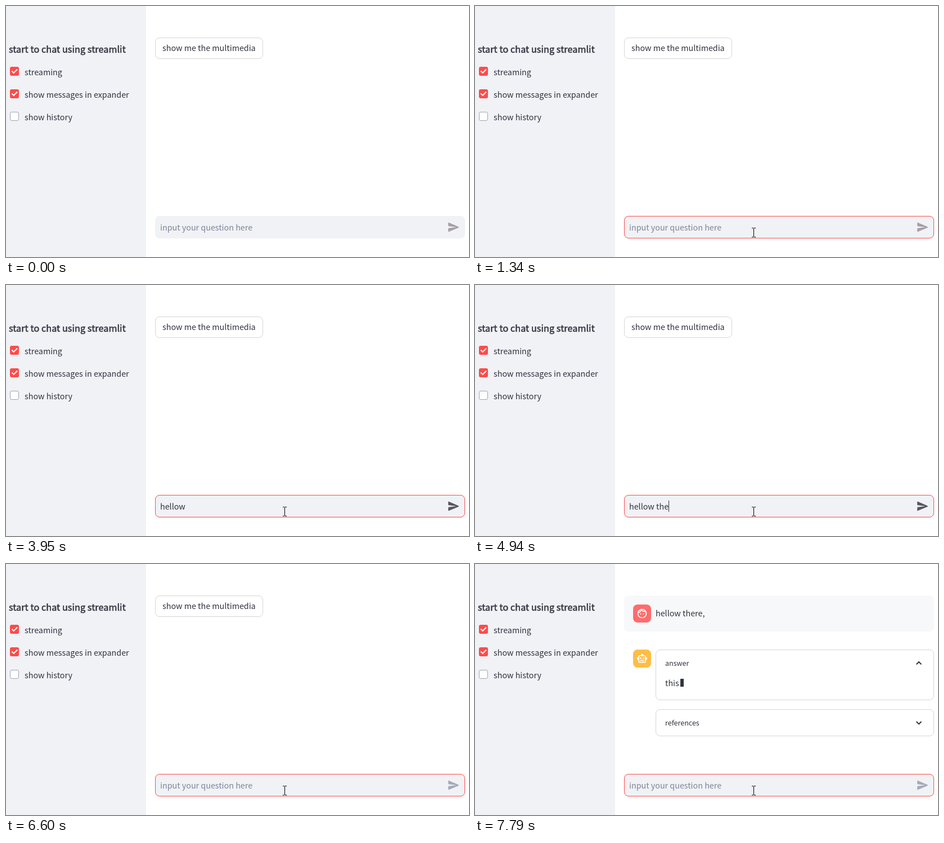
An HTML page that plays this animation: 823 by 446 pixels, repeating every 8000 ms.

```html
<!DOCTYPE html>
<html lang="en">
<head>
<meta charset="utf-8">
<title>Chat demo</title>
<style>
  html, body { margin: 0; width: 100%; height: 100%; overflow: hidden; background: #fff; }
  svg { display: block; }
  text {
    font: 14.32px "Noto Sans CJK SC", "Noto Sans CJK JP", "Noto Sans CJK", "Open Sans", sans-serif;
    fill: #31333f;
    white-space: pre;
  }
  .title { font-size: 16.12px; letter-spacing: .1px; stroke: #31333f; stroke-width: .5px; }
  .small { font-size: 12.53px; }
  .hint { fill: #808495; }
  .card { fill: #fff; stroke: #d6d6d9; }
  .chevron { fill: none; stroke: #31333f; stroke-width: 2; }
</style>
</head>
<body>
<svg width="823" height="446" viewBox="0 0 823 446">
  <defs>
    <g id="checked">
      <rect width="16" height="16" rx="3" fill="#ff4b4b"/>
      <path transform="translate(2.3 3.8) scale(.68)" fill="#fff"
        d="M6.5 12.6L.4 6.6 2.6 4.4 6.5 8.3 14.7 .1 16.9 2.3z"/>
    </g>
  </defs>

  <rect width="249" height="446" fill="#f0f2f6"/>
  <text class="title" x="5" y="83">start to chat using streamlit</text>
  <use href="#checked" x="7" y="108"/>
  <text x="33" y="123">streaming</text>
  <use href="#checked" x="7" y="148"/>
  <text x="33" y="163">show messages in expander</text>
  <rect x="7.5" y="188.5" width="15" height="15" rx="2.5" fill="#fff" stroke="#a3a5ad"/>
  <text x="33" y="203">show history</text>

  <g id="start">
    <rect class="card" x="265.5" y="56.5" width="191" height="37" rx="7.5"/>
    <text x="278" y="80">show me the multimedia</text>
  </g>

  <g id="chat">
    <rect x="265" y="56" width="551" height="64" rx="8" fill="#f7f8fa"/>
    <rect x="281" y="72" width="32" height="32" rx="8" fill="#ff6c6c"/>
    <g transform="translate(287 78) scale(.833)" fill="none" stroke="#fff" stroke-width="2">
      <circle cx="12" cy="12" r="9"/>
      <path d="M3.5 10.5C7 9.5 9.5 7 10.5 3.5C12.5 7 15.5 8.5 20.3 8"/>
      <g fill="#fff" stroke="none">
        <circle cx="9" cy="13" r="1.25"/><circle cx="15" cy="13" r="1.25"/>
      </g>
    </g>
    <text x="321" y="93">hellow there,</text>

    <rect x="281" y="152" width="32" height="32" rx="8" fill="#ffbd45"/>
    <path transform="translate(287 158) scale(.833)" fill="#fff" d="M20 9V7c0-1.1-.9-2-2-2h-3c0-1.66-1.34-3-3-3S9 3.34 9 5H6c-1.1 0-2 .9-2 2v2c-1.66 0-3 1.34-3 3s1.34 3 3 3v4c0 1.1.9 2 2 2h12c1.1 0 2-.9 2-2v-4c1.66 0 3-1.34 3-3s-1.34-3-3-3zm-2 10H6V7h12v12zm-9-6c-.83 0-1.5-.67-1.5-1.5S8.17 10 9 10s1.5.67 1.5 1.5S9.83 13 9 13zm7.5-1.5c0 .83-.67 1.5-1.5 1.5s-1.5-.67-1.5-1.5.67-1.5 1.5-1.5 1.5.67 1.5 1.5zM8 15h8v2H8v-2z"/>
    <rect class="card" x="321.5" y="152.5" width="494" height="89" rx="7.5"/>
    <text class="small" x="338" y="181">answer</text>
    <path class="chevron" d="M784.6 178.4l4.4-4.4 4.4 4.4"/>
    <text id="answer" x="338" y="217"></text>
    <rect id="block" y="204" width="6" height="14" fill="#31333f"/>
    <rect class="card" x="321.5" y="258.5" width="494" height="47" rx="7.5"/>
    <text class="small" x="338" y="287">references</text>
    <path class="chevron" d="M784.6 280l4.4 4.4 4.4-4.4"/>
  </g>

  <rect x="265" y="373" width="551" height="40" rx="8" fill="#f0f2f6"/>
  <rect id="focus" x="265.5" y="373.5" width="550" height="39" rx="7.5" fill="none" stroke="#ff4b4b"/>
  <text id="hint" class="hint" x="274" y="399">input your question here</text>
  <text id="typed" x="274" y="399"></text>
  <rect id="caret" y="383" width="1" height="20" fill="#31333f"/>
  <path id="send" transform="translate(784.2 381.5) scale(.96)" d="M3.4 20.4l17.45-7.48c.81-.35.81-1.49 0-1.84L3.4 3.6c-.66-.29-1.39.2-1.39.91L2 9.12c0 .5.37.93.87.99L17 12 2.87 13.88c-.5.07-.87.5-.87 1l.01 4.61c0 .71.73 1.2 1.39.91z"/>

  <path id="arrow" d="M.5 .5v16l3.7-3.5 2.4 5.6 2.2-1-2.4-5.4h5.1z" fill="#fff" stroke="#000"/>
  <path id="beam" d="M-3 -7.5h3M1 -7.5h3M.5 -7v15M-3 8.5h3M1 8.5h3" fill="none" stroke="#000"/>
</svg>
<script>
const LOOP = 8000;
const PROMPT = "hellow there, ";
const KEYS = [2270, 2340, 2540, 2670, 2870, 3090, 3420, 4670, 4740, 4940, 5010, 5080, 5740, 5870];
const CLICK = 810, SUBMIT = 6530, REPLY = 6730, STREAM = 7590, BLINK = 530;

const $ = id => document.getElementById(id);
const show = (id, on) => $(id).setAttribute("visibility", on ? "inherit" : "hidden");
const clamp = v => Math.min(1, Math.max(0, v));
const setText = (id, s) => { if ($(id).textContent !== s) $(id).textContent = s; };
const endOf = (id, x) => $(id).textContent ? Math.floor(x + $(id).getComputedTextLength()) : x;

function drawPointer(t) {
  const p = 1 - (1 - clamp((t - 250) / 560)) ** 2;
  const x = Math.round(545 - 50 * p), y = Math.round(443 - 41 * p);
  const inside = y < 413;
  for (const id of ["arrow", "beam"]) $(id).setAttribute("transform", `translate(${x} ${y})`);
  show("arrow", t >= 250 && !inside);
  show("beam", inside);
}

function drawInput(t) {
  const sent = t >= SUBMIT;
  const count = sent ? 0 : KEYS.filter(k => k <= t).length;
  setText("typed", PROMPT.slice(0, count));
  show("hint", !count);
  $("send").setAttribute("fill", count ? "#56575f" : sent ? "#a5a9b8" : "#a79fa6");
  $("focus").setAttribute("opacity", clamp((t - CLICK) / 190));

  // Each key restarts the blink
  const since = t - Math.max(CLICK, ...KEYS.filter(k => k <= t));
  show("caret", since >= 0 && Math.floor(since / BLINK) % 2 === 0);
  $("caret").setAttribute("x", endOf("typed", 274));
}

function drawChat(t) {
  show("start", t < REPLY);
  show("chat", t >= REPLY);
  setText("answer", t < STREAM ? "thinking" : t < 7660 ? "" : t < 7790 ? "this" : "this ");
  $("block").setAttribute("x", endOf("answer", 338));
  show("block", t >= STREAM);
}

let begin;
function frame(now) {
  begin ??= now;
  const t = (now - begin) % LOOP;
  drawPointer(t);
  drawInput(t);
  drawChat(t);
  requestAnimationFrame(frame);
}
requestAnimationFrame(frame);
</script>
</body>
</html>
```
